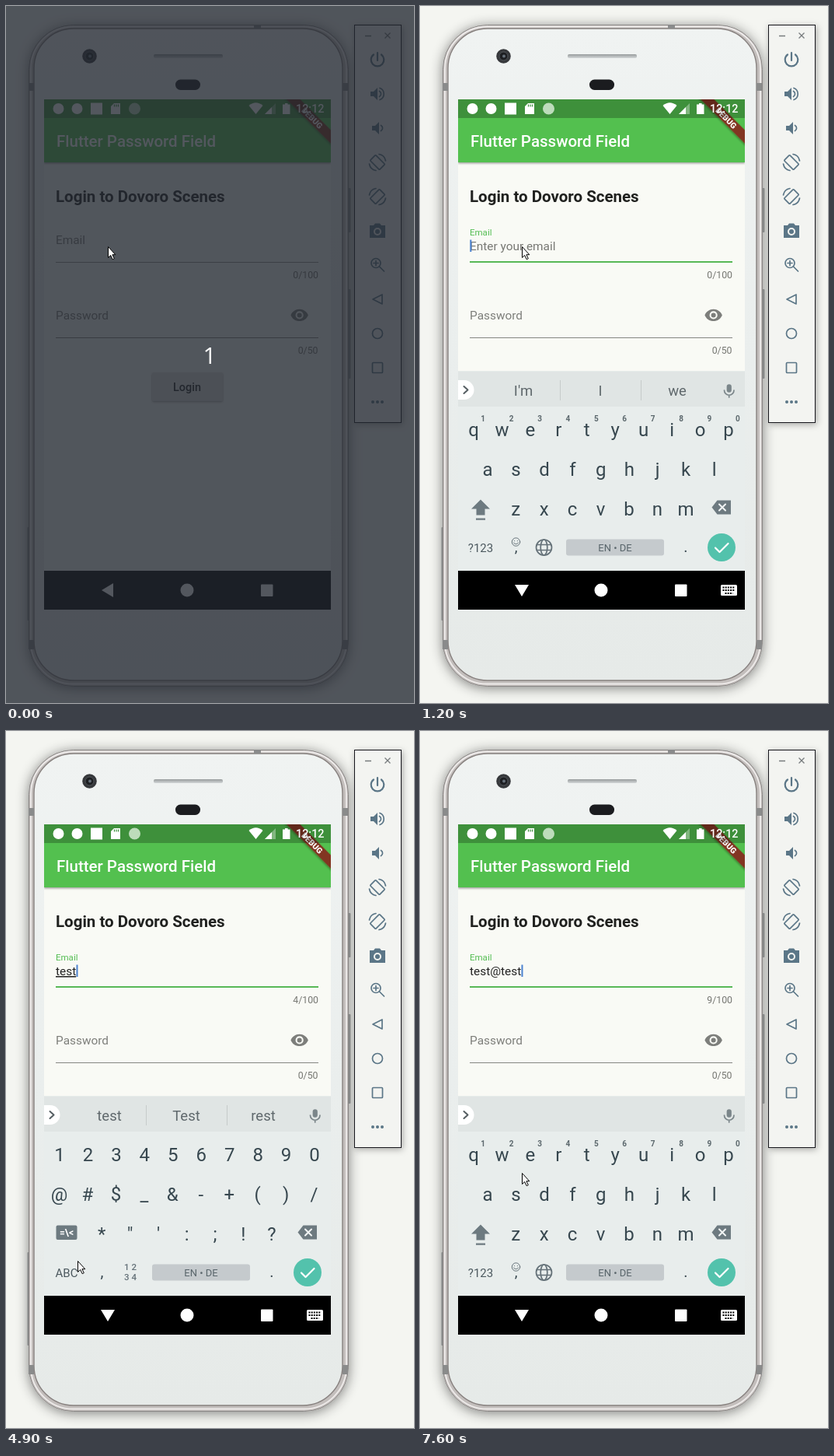
An HTML page for the animation above (8000 ms loop, 525 by 896 pixels).

```html
<!DOCTYPE html>
<html lang="en">
<head>
<meta charset="utf-8">
<title>Password field demo</title>
<style>
  html, body { margin: 0; width: 100%; height: 100%; overflow: hidden; background: #f4f5f1; }
  svg { display: block; width: 525px; height: 896px; font-family: Roboto, sans-serif; }
  text { white-space: pre; }
  .mid { text-anchor: middle; }
  .end { text-anchor: end; }
  .medium { font-weight: 500; }
  .line { fill: none; stroke-linecap: round; stroke-linejoin: round; }
  .field { font-size: 15.4px; text-decoration-thickness: 1px; text-underline-offset: 2px; }
  .small { font-size: 12.3px; fill: #767772; }
  .key { font-size: 24px; fill: #37474f; }
  .tools .fill { fill: #5b7687; }
  .tools .line { stroke: #5b7687; stroke-width: 1.7; }
</style>
</head>
<body>
<svg viewBox="0 0 525 896">
  <defs>
    <linearGradient id="face" x2="0" y2="1">
      <stop stop-color="#f0f3f2"/><stop offset=".5" stop-color="#eaeeed"/><stop offset="1" stop-color="#e6eae8"/>
    </linearGradient>
    <linearGradient id="speaker" x2="0" y2="1"><stop stop-color="#979b9c"/><stop offset="1" stop-color="#d2d6d7"/></linearGradient>
    <filter id="halo" x="-10%" y="-10%" width="120%" height="120%">
      <feDropShadow dx="0" dy="2" stdDeviation="8" flood-color="#000" flood-opacity=".48"/>
    </filter>
    <filter id="panel" x="-40%" y="-10%" width="180%" height="120%">
      <feDropShadow dx="1.5" dy="2" stdDeviation="4" flood-color="#000" flood-opacity=".32"/>
    </filter>
    <filter id="soft" x="-20%" y="-30%" width="140%" height="180%">
      <feDropShadow dx="0" dy="1.5" stdDeviation="1.3" flood-color="#000" flood-opacity=".35"/>
    </filter>
    <clipPath id="screen"><rect x="49" y="120" width="369" height="656"/></clipPath>
    <clipPath id="app"><rect x="49" y="120" width="369" height="606"/></clipPath>
  </defs>

  <rect width="525" height="896" fill="#f4f5f1"/>

  <!-- phone body -->
  <g fill="#aeb0b0">
    <rect x="440" y="234" width="3.5" height="57" rx="1"/>
    <rect x="440" y="364" width="3.5" height="115" rx="1"/>
    <rect x="27.5" y="670" width="3" height="120" rx="1"/>
  </g>
  <rect x="29.5" y="24.5" width="411" height="850" rx="57" fill="#c3bebc" stroke="#8a8786" filter="url(#halo)"/>
  <rect x="32" y="26.5" width="406" height="845" rx="54.500" fill="none" stroke="#eeebea" stroke-width="1.800"/>
  <rect x="36" y="29" width="397" height="838" rx="51" fill="url(#face)" stroke="#87817f" stroke-width="1.400"/>
  <g fill="#8a8b8b">
    <rect x="29" y="99" width="7" height="10"/><rect x="433" y="99" width="7" height="10"/>
    <rect x="29" y="815" width="7" height="12"/><rect x="433" y="815" width="7" height="12"/>
    <rect x="319" y="24" width="9" height="5"/>
  </g>
  <circle cx="107.500" cy="64.500" r="9.300" fill="#36383b"/>
  <circle cx="107.500" cy="64.500" r="5.500" fill="#1d1f22" stroke="#54585c"/>
  <circle cx="108" cy="64.500" r="2" fill="#667079"/>
  <rect x="190" y="62" width="89" height="5" rx="2" fill="url(#speaker)"/>
  <rect x="218" y="94.500" width="32" height="13.500" rx="6.500" fill="#1b1c1f"/>

  <!-- app -->
  <g clip-path="url(#screen)">
    <rect x="49" y="120" width="369" height="656" fill="#f9faf5"/>
    <rect x="49" y="120" width="369" height="81" fill="#52c050" filter="url(#soft)"/>
    <text x="65" y="181" class="medium" font-size="20.5" fill="#fff">Flutter Password Field</text>
    <g transform="translate(418 120) rotate(45)">
      <rect x="-45" y="27.900" width="90" height="12.200" fill="#823422" filter="url(#soft)"/>
      <text class="mid" y="37.700" font-size="10.400" font-weight="900" fill="#fff">DEBUG</text>
    </g>
    <rect x="49" y="120" width="369" height="24" opacity=".25"/>
    <g fill="#fff">
      <circle cx="67.500" cy="132" r="7"/>
      <circle cx="91.500" cy="132" r="7"/>
      <rect x="109" y="124.500" width="15" height="15"/>
      <path d="M139 125h8v14h-12v-10z"/>
      <path d="M139.500 126.500v3m2.500-3v3m2.500-3v3" stroke="#3d903c" stroke-width="1.200"/>
      <circle cx="165.500" cy="132" r="7.500" fill="#bddcbb"/>
      <path d="M312.500 128Q321.500 120.500 330.500 128L321.500 139z"/>
      <path d="M333 139h14v-14z" opacity=".35"/><path d="M333 139h9v-9z"/>
      <path d="M356 126.500h3v-1.500h3.500v1.500h3V139h-9.500z"/>
      <text x="373" y="137" class="medium" font-size="14.400">12:12</text>
    </g>
    <text x="64" y="252" font-size="20.500" font-weight="700" fill="#20211f">Login to Dovoro Scenes</text>

    <path d="M64 329.500H402" stroke="#92938f"/>
    <path id="focus" stroke="#58b856" stroke-width="2"/>
    <text id="label" x="64">Email</text>
    <text id="hint" x="64" y="314" class="field" fill="#777873">Enter your email</text>
    <text id="typed" x="64" y="314" class="field" fill="#222"></text>
    <rect id="caret" y="300.500" width="2" height="15.500" fill="#4b82d0"/>
    <text id="count" x="402" y="350" class="small end"></text>

    <text x="64" y="403" class="field" fill="#7d7e7a">Password</text>
    <path d="M64 426.500H402" stroke="#858682"/>
    <text x="401.500" y="447" class="small end">0/50</text>
    <path transform="translate(365.400 385.200) scale(1.020)" fill="#7d7e7b" d="M12 4.500C7 4.500 2.730 7.610 1 12c1.730 4.390 6 7.500 11 7.500s9.270-3.110 11-7.500c-1.730-4.390-6-7.500-11-7.500zM12 17a5 5 0 1 1 0-10a5 5 0 0 1 0 10zm0-8a3 3 0 1 0 0 6a3 3 0 0 0 0-6z"/>
    <rect x="188" y="471" width="91" height="36.500" rx="2" fill="#e0e1dd" filter="url(#soft)"/>
    <text x="233" y="494.500" class="mid medium" font-size="14.400" fill="#20211f">Login</text>

    <!-- on-screen keyboard -->
    <g clip-path="url(#app)"><g id="keyboard">
      <rect x="49" y="469.500" width="369" height="260" fill="#e8edec"/>
      <rect x="49" y="469.500" width="369" height="45.500" fill="#e0e5e4"/>
      <path d="M49 481h8a12.300 12.300 0 0 1 0 25h-8z" fill="#fff"/>
      <path class="line" d="M56.500 489l5 4.500l-5 4.500" stroke="#555e62" stroke-width="2"/>
      <g id="words" font-size="18.500" fill="#5f686c">
        <path d="M180.500 481v26M284.500 481v26" stroke="#c6cbca"/>
        <text class="mid" x="133" y="501"></text><text class="mid" x="232" y="501"></text><text class="mid" x="331" y="501"></text>
      </g>
      <g stroke="#7b868a" class="line" stroke-width="1.700">
        <rect x="395.500" y="487" width="4.500" height="9" rx="2.200" fill="#7b868a"/>
        <path d="M391.500 494a6.200 6.200 0 0 0 12.500 0M397.700 500.500v2.500"/>
      </g>
      <g id="letters">
        <path d="M78 634.500l12 12h-6.500v8h-11v-8H66zM72 658.500h12v2.200H72z" fill="#6d7a80"/>
        <text x="78" y="701.500" class="mid" font-size="15" fill="#4c595f">?123</text>
        <g class="line" stroke="#647178">
          <circle cx="123.500" cy="689" r="5.200"/><path d="M121.500 687.500v.2m4-.2v.2m-5 2.300q3 3.500 6 0"/>
          <g stroke-width="1.700"><circle cx="159.500" cy="696" r="10"/><ellipse cx="159.500" cy="696" rx="4.300" ry="10"/><path d="M150.500 692.500h18m-18 7h18"/></g>
        </g>
        <text x="123.500" y="702" class="mid" font-size="19" fill="#37474f">,</text>
      </g>
      <g id="symbols">
        <rect x="64.500" y="635.500" width="27" height="18.500" rx="2" fill="#6d7a80"/>
        <text x="78" y="649" class="mid" font-size="12" font-weight="700" fill="#fff">=\&lt;</text>
        <text x="78" y="701.500" class="mid" font-size="15" fill="#4c595f">ABC</text>
        <text x="123.500" y="702" class="mid" font-size="20" fill="#37474f">,</text>
        <g class="mid medium" font-size="11.500" fill="#647178"><text x="160" y="693">1 2</text><text x="160" y="706">3 4</text></g>
      </g>
      <path d="M382.500 635.500h17.500v18h-17.500l-7-9z" fill="#6d7a80"/>
      <path d="M385 640.500l8 8m0-8l-8 8" class="line" stroke="#f2f5f5" stroke-width="2"/>
      <rect x="188" y="685.500" width="126" height="21" rx="3" fill="#c5cacd"/>
      <text x="251" y="701" class="mid" font-size="13" fill="#5a666c">EN • DE</text>
      <text x="342" y="702" class="mid key" style="font-size:20px">.</text>
      <circle cx="388" cy="696" r="18" fill="#53c2ac"/>
      <path d="M380 696.500l5.500 5.500l11-11" class="line" stroke="#fff" stroke-width="2.200"/>
      <g id="popup">
        <rect x="49" y="501" width="39.500" height="113" rx="3" fill="#d5d9d8" filter="url(#soft)"/>
        <text x="68.500" y="541" class="mid" font-size="27" fill="#37474f">@</text>
      </g>
    </g></g>

    <!-- navigation bar -->
    <rect x="49" y="726" width="369" height="50"/>
    <g fill="#fff">
      <path id="back" d="M123 751l15-9v18z"/>
      <circle cx="233" cy="751" r="8.500"/>
      <rect x="328" y="743.500" width="15.500" height="15.500" rx="1"/>
      <g id="down">
        <path d="M122 744h18l-9 15z"/>
        <rect x="387" y="744" width="21" height="14" rx="1.500"/>
        <path d="M389.500 747.500h16m-16 3.500h16m-13 4h10" stroke="#000" stroke-width="1.800" stroke-dasharray="2 1.200"/>
      </g>
    </g>
  </g>

  <!-- emulator toolbar -->
  <g class="tools">
    <rect x="448.500" y="24.500" width="60" height="511" fill="#f3f4f1" stroke="#16181a" filter="url(#panel)"/>
    <path d="M462 38.500h8m17.500-4l7 7m0-7l-7 7" fill="none" stroke="#777b7d" stroke-width="1.300"/>
    <g transform="translate(478 69)"><path class="line" style="stroke-width:2.200" d="M0-9V1M-5-6.500a8.300 8.300 0 1 0 10 0"/></g>
    <g transform="translate(478 113)"><path class="fill" d="M-9-3h4l5-5V8l-5-5h-4z"/><path class="line" d="M2.500-3.500a4 4 0 0 1 0 7M3-7.500a8 8 0 0 1 0 15"/></g>
    <g transform="translate(478 157)"><path class="fill" d="M-7-3h4l5-5V8l-5-5h-4z"/><path class="line" d="M4.500-3.500a4 4 0 0 1 0 7"/></g>
    <g id="turn" transform="translate(478 201)"><rect class="line" x="-5" y="-8.500" width="10" height="17" rx="1" transform="rotate(-45)"/><path class="line" d="M2-10.500a10.500 10.500 0 0 1 8.500 8.500M-2 10.500a10.500 10.500 0 0 1-8.500-8.500"/></g>
    <use href="#turn" transform="translate(956 44) scale(-1 1)"/>
    <g transform="translate(478 289)"><path class="fill" fill-rule="evenodd" d="M-10-7h5l2-2.500h6l2 2.500h5V9h-20zM0-4a5 5 0 1 0 0 10a5 5 0 0 0 0-10z"/><circle class="fill" cy="1" r="3"/></g>
    <g transform="translate(478 333)"><circle class="line" cx="-2" cy="-2.500" r="6"/><path class="line" d="M2.500 2l6 6M-5-2.500h6M-2-5.500v6"/></g>
    <path class="line" d="M484 371v12l-12-6z"/>
    <circle class="line" cx="478" cy="421" r="6.500"/>
    <rect class="line" x="471.500" y="458.500" width="13" height="13" rx="1"/>
    <g class="fill"><circle cx="472" cy="509" r="2"/><circle cx="478" cy="509" r="2"/><circle cx="484" cy="509" r="2"/></g>
  </g>

  <g id="countdown">
    <rect width="525" height="896" fill="#232831" opacity=".78"/>
    <text x="262" y="459.500" class="mid" font-size="30" fill="#fff" style="font-family:'Open Sans',sans-serif">1</text>
  </g>
  <path id="pointer" d="M.5.500V14.500L3.700 11.500L6.200 16.700L8.300 15.700L5.900 10.700H9.800z" fill="#fff" stroke="#000" stroke-linejoin="round"/>
</svg>
<script>
const LOOP = 8000, PITCH = 36.45;
const $ = id => document.getElementById(id);

// Each row: [time, value]; a value holds until the next row.
const steps = {
  label: [[0, 0], [1000, .5], [1100, .9], [1200, 1]],
  focus: [[0, 0], [700, .5], [800, 1]],
  rise: [[0, 260], [1000, 150], [1100, 35], [1200, 0]],
  hint: [[0, 0], [1000, .3], [1100, .7], [1200, 1], [2300, .5], [2400, .2], [2500, 0]],
  caret: [[0, 0], [700, 1], [1500, 0], [2000, 1], [3800, 0], [4200, 1], [6200, 0], [6600, 1]],
  text: [[0, ''], [2300, 't'], [2600, 'te'], [3000, 'tes'], [3300, 'test'], [5600, 'test@'],
    [7000, 'test@t'], [7200, 'test@te'], [7400, 'test@tes'], [7600, 'test@test']],
  words: [[0, "I'm I we"], [2300, 'to the that'], [2600, 'the te test'], [3000, 'tes test yes'],
    [3300, 'test Test rest'], [5600, '']],
  pointer: [[0, [131, 309]], [3600, [112, 441]], [3700, [105, 525]], [3800, [101, 585]], [3900, [98, 627]],
    [4000, [95, 654]], [4100, [93, 670]], [4200, [91, 677]], [4400, [80, 688]], [4900, [92, 681]],
    [5300, [87, 662]], [5400, [77, 630]], [5500, [70, 608]], [5800, [70, 625]], [5900, [70, 665]],
    [6000, [70, 688]], [6100, [70, 694]], [6200, [80, 682]], [6300, [96, 646]], [6400, [113, 607]],
    [6500, [126, 579]], [6600, [131, 568]]]
};
const at = (name, t) => steps[name].findLast(([start]) => start <= t)[1];
const set = (id, attrs) => Object.entries(attrs).forEach(([k, v]) => $(id).setAttribute(k, v));
const show = (id, on) => { $(id).style.display = on ? '' : 'none'; };

function addText(parent, x, y, content, attrs) {
  const el = document.createElementNS('http://www.w3.org/2000/svg', 'text');
  Object.entries({ x, y, ...attrs }).forEach(([k, v]) => el.setAttribute(k, v));
  el.textContent = content;
  $(parent).append(el);
}
function addRow(parent, x, y, keys) {
  [...keys].forEach((key, i) => addText(parent, x + i * PITCH, y, key, { class: 'mid key' }));
}
addRow('letters', 69, 553, 'qwertyuiop');
addRow('letters', 87, 604, 'asdfghjkl');
addRow('letters', 123.2, 655, 'zxcvbnm');
[...'1234567890'].forEach((digit, i) =>
  addText('letters', 81.2 + i * 36.4, 533.5, digit, { class: 'mid', 'font-size': 10, 'font-weight': 700, fill: '#5c686d' }));
addRow('symbols', 69, 553, '1234567890');
addRow('symbols', 68.5, 604, '@#$_&-+()/');
addRow('symbols', 123.2, 655, '*"\':;!?');

const wordSlots = $('words').querySelectorAll('text');

function draw(t) {
  const text = at('text', t), words = at('words', t).split(' ');
  const float = at('label', t), focus = at('focus', t);
  const symbols = t >= 4900 && t < 6100;

  show('countdown', t < 500);
  set('label', { y: 306 - 11 * float, 'font-size': 15.4 - 3.9 * float, fill: float ? '#55bd53' : '#7d7e7a' });
  set('focus', { d: `M${233 - 169 * focus} 329H${233 + 169 * focus}`, opacity: focus ? 1 : 0 });
  set('hint', { opacity: at('hint', t) });
  $('typed').textContent = text;
  $('typed').style.textDecorationLine = text && !text.includes('@') ? 'underline' : 'none';
  $('count').textContent = `${text.length}/100`;
  const width = text ? $('typed').getComputedTextLength() : 0;
  set('caret', { x: 64.3 + width, opacity: at('caret', t) });

  show('keyboard', t >= 1000);
  set('keyboard', { transform: `translate(0 ${at('rise', t)})` });
  show('words', words.length > 1);
  wordSlots.forEach((slot, i) => { slot.textContent = words[i] || ''; });
  show('letters', !symbols);
  show('symbols', symbols);
  show('popup', t >= 5500 && t < 5700);
  show('back', t < 800);
  show('down', t >= 800);
  set('pointer', { transform: `translate(${at('pointer', t)})` });
}

const start = performance.now();
function tick() {
  draw((performance.now() - start) % LOOP);
  requestAnimationFrame(tick);
}
tick();
</script>
</body>
</html>
```
